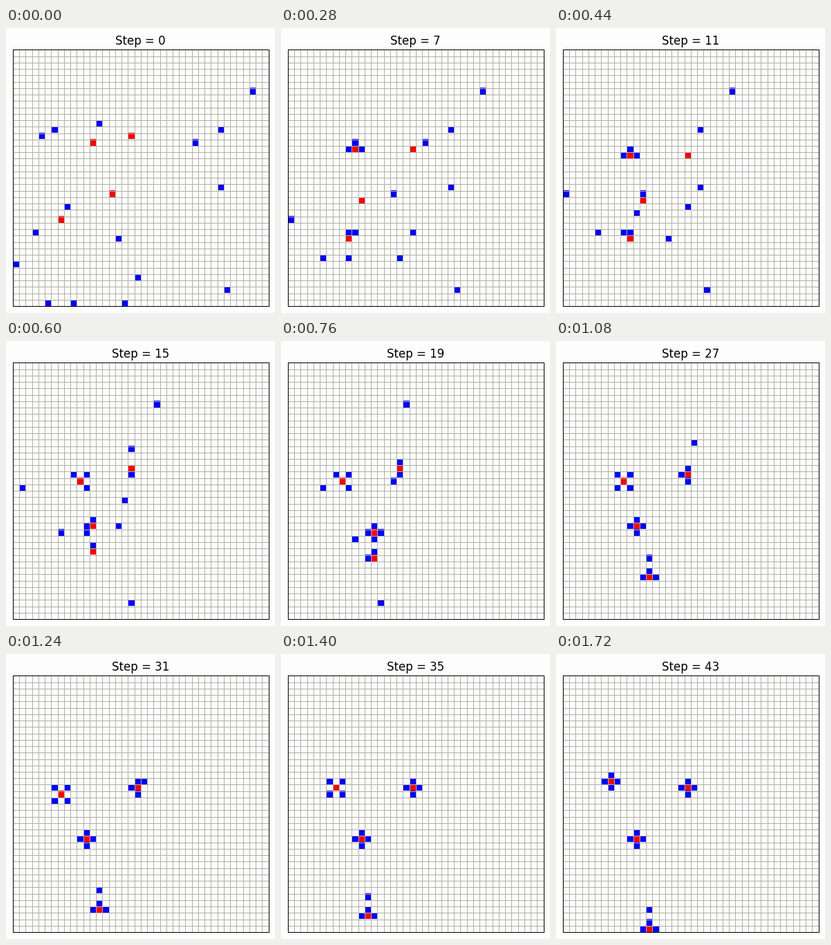
Write a matplotlib script that moves like this. It is 389 by 411 pixels and loops after 1760 ms.

```python
import math

import matplotlib.pyplot as plt
import numpy as np
from matplotlib.animation import FuncAnimation
from matplotlib.patches import Rectangle

W, H, DPI = 389, 411, 100
CELLS = 40
LEFT, TOP, PITCH = 10, 31, 9.25             # whole-pixel raster of the cells
GRID_LEFT, GRID_TOP, GRID_PITCH = 10, 31.4, 9.24
STEPS, STEP_MS = 44, 40
PAPER, GRID = "#fdfdfe", "#b0b0a4"
PREY, HUNTER = "#ff0000", "#0000ff"

# Steps at which a prey passes its key points (column, row).
TIMES = (0, 7, 11, 19, 27, 35, 43)
SWING = range(15, 40)                       # steps spent on the diagonals
QUEUE = (0, -3)                             # waiting place behind the prey

# Hunters are listed by the side they aim for: north, east, south, west.
PACKS = [
    dict(prey=[(12, 14), (10, 15), (10, 16), (8, 18), (9, 18), (7, 17), (7, 16)],
         hunters=[(6, 12), (13, 11), (0, 33), (4, 13)], swings=True),
    dict(prey=[(18, 13), (19, 15), (19, 16), (17, 16), (19, 17)],
         hunters=[(32, 12), (37, 6), (28, 14), (32, 21)]),
    dict(prey=[(15, 22), (11, 23), (12, 23), (13, 26), (11, 25)],
         hunters=[(16, 29), (19, 35), (9, 39), (3, 28)]),
    dict(prey=[(7, 26), (9, 29), (10, 29), (13, 30), (13, 33), (12, 37), (13, 39)],
         hunters=[(8, 24), (33, 37), (5, 39), (17, 39)], queues=True),
]


def walk(a, b, n):
    """Cell reached n moves from a towards b, the longer leg first."""
    gap = np.subtract(b, a)
    lead = 0 if abs(gap[0]) > abs(gap[1]) else 1
    pos = list(a)
    first = min(n, abs(gap[lead]))
    pos[lead] += np.sign(gap[lead]) * first
    pos[1 - lead] += np.sign(gap[1 - lead]) * (n - first)
    return tuple(pos)


def prey_at(points, step):
    """Moves are spread evenly between two key points."""
    leg = max(i for i, t in enumerate(TIMES) if t <= step)
    if leg + 1 >= len(points):
        return points[-1]
    a, b = points[leg], points[leg + 1]
    u = (step - TIMES[leg]) / (TIMES[leg + 1] - TIMES[leg])
    return walk(a, b, int(np.abs(np.subtract(b, a)).sum() * u + 0.5))


def ring(n):
    """Neighbour offset n eighths of a turn clockwise from north."""
    a = n * math.pi / 4
    return round(math.sin(a)), -round(math.cos(a))


def slot(pack, side, step):
    if pack.get("queues") and side == 2:
        return QUEUE
    return ring(2 * side + (pack.get("swings", False) and step in SWING))


def hunt(pack, side, prey):
    """One cell per step to the slot, aligning on the longer axis first."""
    pos = np.array(pack["hunters"][side])
    track = [tuple(pos)]
    dx, dy = np.abs(np.add(prey[0], slot(pack, side, 0)) - pos)
    lead = 0 if dx > dy else 1
    for step in range(1, STEPS):
        gap = np.add(prey[step], slot(pack, side, step)) - pos
        axis = lead if gap[lead] else 1 - lead
        pos[axis] += np.sign(gap[axis])
        track.append(tuple(pos))
    return track


def edge(k):
    """Pixel offset of the first pixel of cell k."""
    return math.ceil(PITCH * k - 0.5)


def cell_box(col, row):
    x, y = edge(col), edge(row)
    return LEFT + x, TOP + y, edge(col + 1) - x, edge(row + 1) - y


fig = plt.figure(figsize=(W / DPI, H / DPI), dpi=DPI, facecolor=PAPER)
ax = fig.add_axes([0, 0, 1, 1])
ax.set_xlim(0, W)
ax.set_ylim(H, 0)
ax.axis("off")


def add_box(x, y, w, h, color, z):
    return ax.add_patch(Rectangle((x, y), w, h, facecolor=color, linewidth=0,
                                  antialiased=False, zorder=z))


side_px = edge(CELLS) + 1
for k in range(CELLS + 1):
    color, z = ("black", 4) if k in (0, CELLS) else (GRID, 3)
    add_box(math.floor(GRID_LEFT + GRID_PITCH * k + 0.5), TOP, 1, side_px, color, z)
    add_box(LEFT, math.floor(GRID_TOP + GRID_PITCH * k + 0.5), side_px, 1, color, z)

agents = []
for pack in PACKS:
    prey = [prey_at(pack["prey"], s) for s in range(STEPS)]
    agents.append((prey, add_box(0, 0, 1, 1, PREY, 2)))
    for side in range(4):
        agents.append((hunt(pack, side, prey), add_box(0, 0, 1, 1, HUNTER, 1)))

title = ax.text(194.8, 24.1, "", fontsize=12, family="DejaVu Sans",
                color="black", ha="center", va="baseline")


def draw(step):
    for track, patch in agents:
        patch.set_bounds(*cell_box(*track[step]))
    title.set_text(f"Step = {step}")
    return [patch for _, patch in agents] + [title]


anim = FuncAnimation(fig, draw, frames=STEPS, init_func=lambda: draw(0),
                     interval=STEP_MS, repeat=True, repeat_delay=0)
plt.show()
```
